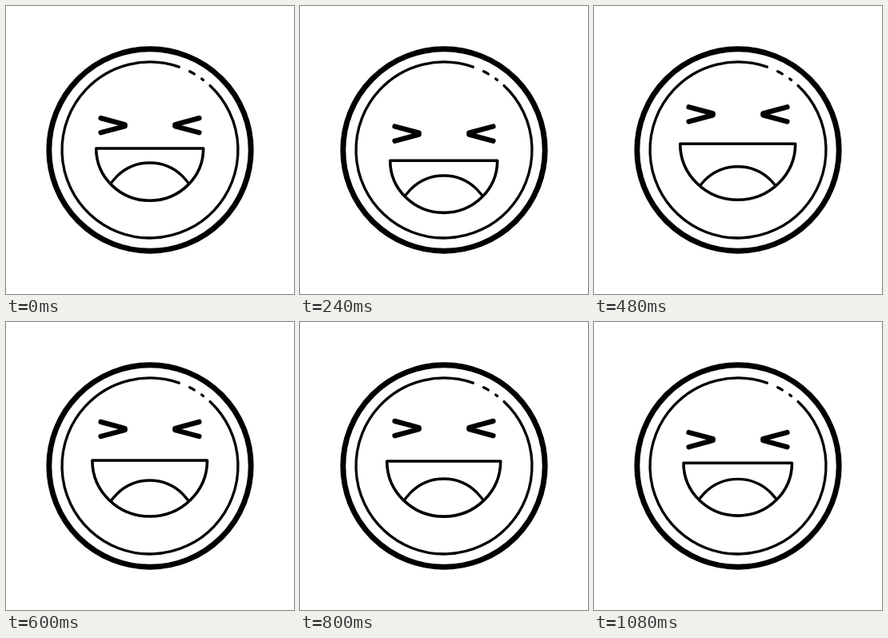
Animation of 360x360 px, one loop 1.12 s. Source, as an HTML page with a canvas:

```html
<!DOCTYPE html>
<html lang="en">
<head>
<meta charset="utf-8">
<title>Laughing face</title>
<style>
  html, body { margin: 0; width: 100%; height: 100%; overflow: hidden; background: #fff; }
  canvas { display: block; width: 360px; height: 360px; }
</style>
</head>
<body>
<canvas id="stage" width="360" height="360"></canvas>
<script>
const ctx = document.getElementById('stage').getContext('2d');
const LOOP = 1120, STEP = 40, MID = 180;
const DIP = 240, JUMP = 360, LAUGH = 800, FALL = 960;

// The face dips, jumps up, laughs and sinks back
const eyeY = track([0, 149.2], [DIP, 159.6], [JUMP, 137.3], [LAUGH, 133]);
const lipY = track([0, 178], [DIP, 193.2], [JUMP, 171.8], [LAUGH, 174], [FALL, 172.8]);
const tongueY = track([0, 196], [DIP, 212], [JUMP, 204], [LAUGH, 196], [FALL, 198.7]);

// The mouth widens with the jump, then narrows ever faster
function halfWidth(t) {
  const rise = clamp((t - DIP) / (JUMP - DIP));
  const fall = clamp((t - JUMP) / (LOOP - JUMP));
  return 67 + 5 * (rise * rise * (3 - 2 * rise) - fall ** 3);
}

function clamp(u) {
  return Math.min(1, Math.max(0, u));
}

// Looping monotone cubic through [time, value] keys
function track(...keys) {
  const n = keys.length;
  const next = i => keys[(i + 1) % n];
  const span = i => (next(i)[0] - keys[i][0] + LOOP) % LOOP;
  const slope = i => (next(i)[1] - keys[i][1]) / span(i);
  const tangent = i => {
    const a = slope((i + n - 1) % n), b = slope(i);
    return a * b > 0 ? 2 * a * b / (a + b) : 0;
  };
  return t => {
    let i = n - 1;
    while (keys[i][0] > t) i--;
    const h = span(i), u = (t - keys[i][0]) / h, v = 1 - u;
    return v * v * (1 + 2 * u) * keys[i][1] + u * u * (3 - 2 * u) * next(i)[1]
      + h * u * v * (v * tangent(i) - u * tangent((i + 1) % n));
  };
}

function stroke(width, path) {
  ctx.lineWidth = width;
  ctx.beginPath();
  path();
  ctx.stroke();
}

// Arc of the inner ring, clockwise, in degrees above the horizontal
function ringArc(from, to) {
  const rad = d => -d * Math.PI / 180;
  stroke(3.3, () => ctx.arc(MID, MID, 110, rad(from), rad(to)));
}

function drawRings() {
  stroke(6.9, () => ctx.arc(MID, MID, 126.2, 0, 2 * Math.PI));
  ringArc(47, -289.3);
  ringArc(63.2, 59.8);
  ringArc(54, 52.8);
}

function drawEye(side, y) {
  const outer = MID + side * 61.5, tip = MID + side * 31.3;
  stroke(6.3, () => {
    ctx.moveTo(outer, y - 9.1);
    ctx.lineTo(tip, y - 1);
    ctx.lineTo(tip, y + 1);
    ctx.lineTo(outer, y + 9.1);
  });
}

function drawMouth(t) {
  const x = MID - 0.3, top = lipY(t), w = halfWidth(t), r = 58.5;
  const outline = () => {
    ctx.ellipse(x, top, w, w * 0.973, 0, 0, Math.PI);
    ctx.closePath();
  };
  ctx.save();
  ctx.beginPath();
  outline();
  ctx.clip();
  stroke(3.4, () => ctx.arc(x, tongueY(t) + r, r, Math.PI, 2 * Math.PI));
  ctx.restore();
  stroke(3.6, outline);
}

function draw(now) {
  const t = Math.floor(now % LOOP / STEP) * STEP;
  ctx.fillStyle = '#fff';
  ctx.fillRect(0, 0, 360, 360);
  ctx.strokeStyle = '#000';
  ctx.lineCap = ctx.lineJoin = 'round';
  drawRings();
  drawEye(-1, eyeY(t));
  drawEye(1, eyeY(t));
  drawMouth(t);
}

const start = performance.now();
function frame() {
  draw(performance.now() - start);
  requestAnimationFrame(frame);
}
frame();
</script>
</body>
</html>
```
